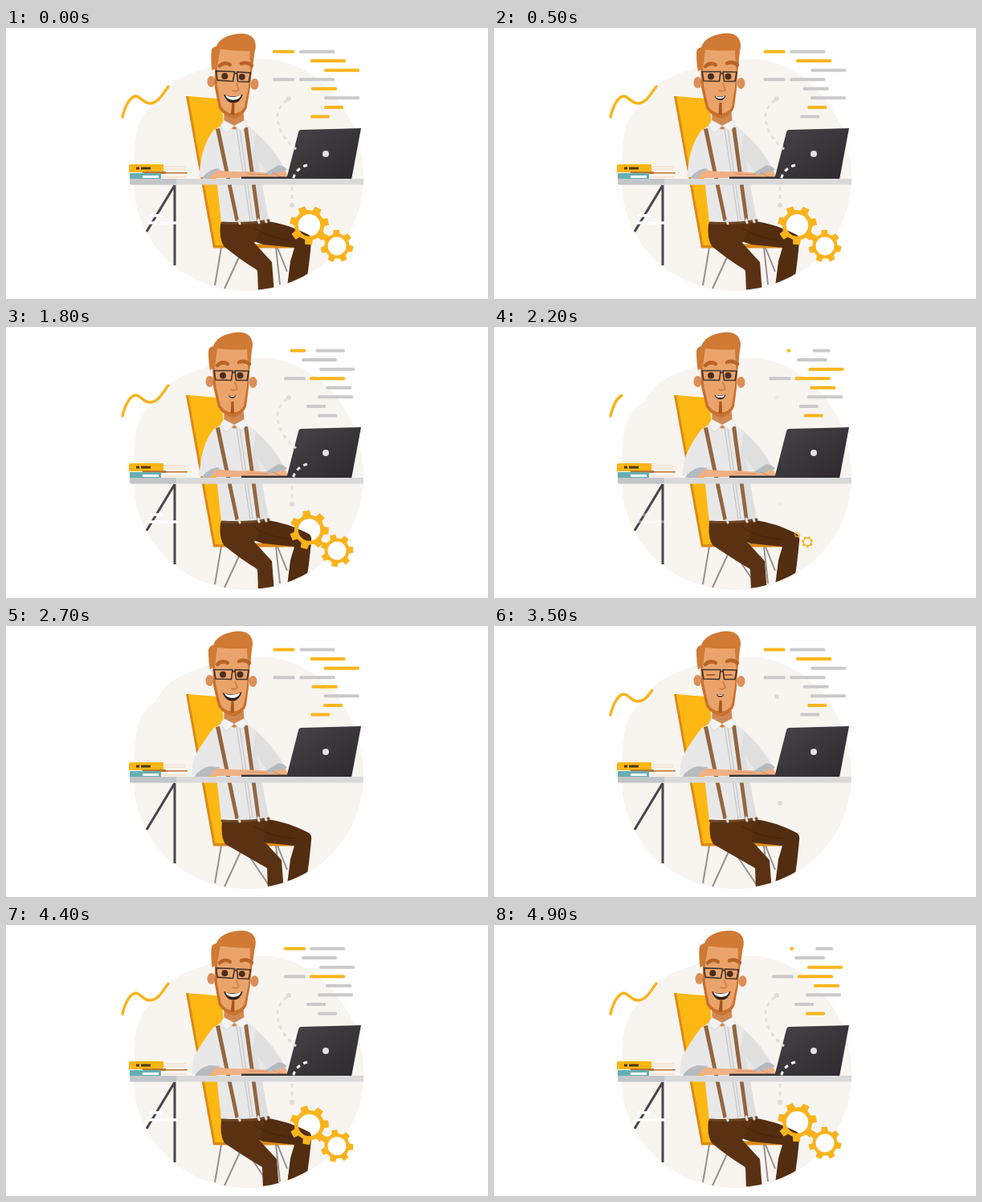
These frames come from a looping animation (600x338 px, 5000 ms). An HTML page:

```html
<!DOCTYPE html>
<html lang="en">
<head>
<meta charset="utf-8">
<title>Developer at a desk</title>
<style>
html, body { margin: 0; width: 100%; height: 100%; overflow: hidden; background: #fff; }
svg { display: block; width: 100%; height: 100%; }
.line { fill: none; stroke-linecap: round; stroke-linejoin: round; }
.flat { fill: none; }
</style>
</head>
<body>
<svg viewBox="0 0 600 338">
  <defs>
    <clipPath id="disc"><circle cx="302" cy="184" r="143"/></clipPath>
    <linearGradient id="lid" x1="0" y1="0" x2="1" y2="1">
      <stop offset="0" stop-color="#464447"/><stop offset="1" stop-color="#2b292b"/>
    </linearGradient>
  </defs>

  <path fill="#f8f4f0" d="M160 170C158 128 168 103 187 94C199 66 225 58 250 50C270 41 300 38 330 39C392 47 444 108 445 184C446 264 382 328 302 328C232 328 172 284 160 210Z"/>
  <path id="squiggle" class="line" pathLength="100" stroke="#f9b31c" stroke-width="3.4" d="M145 111C148 98 154 86 161 85C168 85 170 94 180 94C190 93 195 82 202 73"/>
  <g id="rows"></g>

  <!-- chair -->
  <path class="flat" stroke="#96928f" stroke-width="2" d="M268 274L260 321M295 275L272 325M296 277L327 323M336 274L341 320M338 274L350 304"/>
  <path fill="#dc8a15" d="M224 85H228L262 270L366 269L363 274.500H258Z"/>
  <path fill="#fdb813" d="M227 85L263 88Q268 90 269 98L276 180L272 230L278 271H260.500Z"/>

  <!-- table legs -->
  <path class="flat" stroke="#48464b" stroke-width="3" d="M210 196L175 254M210 196V296"/>
  <path id="cuts" class="line" stroke="#fff" stroke-width="3.500" d="M180 234H194M178 243H213"/>

  <circle id="hole1" fill="#fff"/><circle id="hole2" fill="#fff"/>

  <!-- trousers -->
  <g clip-path="url(#disc)">
    <path fill="#532d10" d="M300 243L326 241Q352 245 377 258Q381 261 380 267Q378 292 372 330H349L354 291L359 274L320 270L296 262Z"/>
    <path id="leg" fill="#5a3213"/>
    <path class="line" stroke="#462408" d="M309 250Q330 263 358 265"/>
  </g>

  <!-- shirt -->
  <path id="shirt" fill="#e9e8e8"/>
  <path fill="#e0dfe0" d="M311 131Q331 149 348 177L326 181L313 163L327 239L318 241L303 180Z"/>
  <path class="line" stroke="#c6c5c7" stroke-width="1.200" d="M287 126L304 240M291 126L307 239"/>
  <path fill="#936640" d="M261 126L266 125L290 240L285.500 241ZM296 124L301 124L316.500 239L312 240Z"/>
  <path class="line" stroke="#6d4725" stroke-width="3" d="M269 243Q300 245 327 240"/>
  <path class="line" stroke="#dedbd8" stroke-width="3" d="M290 240L291 244M314 239L315 243M323 239L324 242"/>

  <!-- head -->
  <path fill="#d08850" d="M272 99H295L297 120L284 127L271 120Z"/>
  <path fill="#f4f3f3" stroke="#d0cfd0" stroke-width=".6" d="M271 115L284 122L274 131L267 122ZM297 115L284 122L294 129L300 121Z"/>
  <g id="head">
    <ellipse cx="253.500" cy="68" rx="5" ry="7" fill="#dc8f58"/>
    <ellipse cx="307.500" cy="69" rx="5" ry="7" fill="#dc8f58"/>
    <path fill="#c9712e" d="M257 44H304L302 76L299 99Q296 108 284 113Q270 110 264 100L258 74Z"/>
    <path fill="#eaa46b" d="M259 26H303L300 74L296 98Q293 105 283 107Q272 106 267 98L261 72Z"/>
    <path fill="#cf7a35" d="M254 54Q252 45 252 31Q252 25 258 24Q262 12 279 8Q295 4 303 11Q309 18 306 29L304 50L301 50L300 28Q282 29 263 27L260 50Z"/>
    <path class="line" stroke="#b96427" stroke-width="4.500" d="M263 48Q269 42 276 46M290 44Q297 41 303 46"/>
    <g id="open" fill="#4a2e1f"><circle cx="270" cy="60.500" r="4"/><circle cx="291.500" cy="60.500" r="4"/></g>
    <path id="shut" class="line" stroke="#8a5230" stroke-width="1.500" d="M265 61H275M287 61H296"/>
    <path class="line" stroke="#42332c" stroke-width="1.600" d="M259 54.500L282 54.500L280.500 66.500L261 66ZM285 54.500L302 55L300 66.500L286.500 66.500ZM282 57Q283.500 56 285 57"/>
    <path class="line" stroke="#d3834c" stroke-width="2" d="M285 69L288 77Q285 80 281 78"/>
    <g id="mouth">
      <path fill="#30221c" d="M-12 -3Q0 2 12 -4Q9 8 0 8Q-8 8 -12 -3Z"/>
      <path fill="#fff" d="M-10 -2Q0 2.500 10 -3Q8 4 0 4Q-7 4 -10 -2Z"/>
    </g>
    <path fill="#a8571e" d="M280.500 93H283.500L284 108H279.500Z"/>
  </g>

  <!-- arms -->
  <path fill="#efb084" d="M258 176Q276 180 298 179L333 181L347 176L352 187H252Z"/>
  <path id="cuff" fill="#b6bbc0"/>
  <path fill="#b6bbc0" d="M323 181L339 171Q347 172 350 177L329 183Z"/>
  <path class="line" stroke="#d98f63" d="M301 182L326 183M332 181L343 186"/>
  <path fill="#39373a" d="M293 185.500H352V188.500H293Z"/>

  <!-- laptop -->
  <path fill="url(#lid)" d="M367 127L442 125L430 189H349L364 130Q365 127 367 127Z"/>
  <circle cx="398" cy="157" r="4" fill="#e2e2e2"/>

  <!-- books -->
  <path fill="#faf4ee" d="M190 170H224V188H190Z"/>
  <path class="line" stroke="#efd8c4" d="M196 173H224M196 176H223M196 186H224"/>
  <path fill="#fbb514" d="M153 171L155 170H196V180H153Z"/>
  <path fill="#b97635" d="M170 179H199V182H170ZM199 180H226V181.500H199Z"/>
  <path fill="#67aeb2" d="M154 181H193V189H154Z"/>
  <path fill="#4d3713" d="M162 173.500H166V176.500H162ZM168 173.500H180V176.500H168Z"/>
  <path fill="#fff" d="M170 184H190V187H170Z"/>

  <!-- table top -->
  <path fill="#d9d9da" d="M154 188H445V195.500H154Z"/>
  <path fill="#c3c6c9" d="M154 188H212V195.500H157Q154 195 154 192Z"/>

  <!-- dotted links -->
  <g id="links" class="flat" stroke="#e2dfdd" stroke-width="3" stroke-dasharray="5 5">
    <path d="M350 90Q337 99 338 114Q341 136 361 151M356 198V219"/>
    <path stroke="#fff" d="M375 171Q360 175 357 190"/>
  </g>
  <g id="ends" fill="#dedbd9"><circle cx="352" cy="88" r="3"/><circle cx="356" cy="221" r="3"/></g>

  <path id="gear1" fill="#f9b31c" fill-rule="evenodd"/>
  <path id="gear2" fill="#f9b31c" fill-rule="evenodd"/>
</svg>

<script>
const LOOP = 5000, STEP = 100, CYCLE = 3000;
const YELLOW = '#fbb51d', GREY = '#cbc9c9';
const $ = id => document.getElementById(id);
const set = (el, attrs) => { for (const k in attrs) el.setAttribute(k, attrs[k]); };
const show = (el, on) => el.style.display = on ? '' : 'none';

// Eased 0 to 1 between two times.
function ramp(t, from, to) {
  const x = Math.min(1, Math.max(0, (t - from) / (to - from)));
  return x * x * (3 - 2 * x);
}
// 1 at rest, falls to 0 at one time and comes back at another.
const rest = (t, leave, back, span = 500) =>
  1 - ramp(t, leave, leave + span) + ramp(t, back, back + span);

// Code bars: each slides aside during a cycle and may change colour on the way.
const tones = {
  yellow: () => true,
  grey: () => false,
  early: p => p < 200 || p > 1850,
  late: p => p < 750 || p > 2300,
  middle: p => p > 750 && p < 2300
};
const bars = [];
function bar(row, x, w, shift, tone) {
  const el = document.createElementNS('http://www.w3.org/2000/svg', 'rect');
  set(el, { y: 27.5 + row * 11.57, height: 4, rx: 1.5 });
  $('rows').append(el);
  bars.push({ el, row, x, w, shift, tone });
}
for (const row of [0, 3]) {
  bar(row, 332, 27, 14, row ? 'grey' : 'yellow');
  bar(row, 365, 44, 13, row ? 'middle' : 'grey');
}
bar(1, 379, 44, -11, 'late');
bar(2, 396, 44, -6, 'early');
bar(4, 380, 32, 18, 'early');
bar(5, 396, 44, -8, 'grey');
bar(6, 396, 24, -22, 'late');
bar(7, 379, 24, 9, 'early');

function drawBars(p) {
  const slide = 1 - rest(p, 200, 1900, 900);
  // The top rows are wiped from the left and drawn again.
  const wipe = 30 * (1 - rest(p, 1700, 2100, 300));
  for (const b of bars) {
    const cut = Math.min(b.w, Math.max(0, wipe - b.row * 16));
    set(b.el, {
      x: b.x + b.shift * slide + cut, width: b.w - cut,
      fill: tones[b.tone](p) ? YELLOW : GREY
    });
  }
}

const ring = (x, y, r) => `M${x - r} ${y}a${r} ${r} 0 1 0 ${2 * r} 0a${r} ${r} 0 1 0 ${-2 * r} 0Z`;

function gear(n, x, y, r, turn) {
  const teeth = 7, points = [];
  const add = (deg, len) => {
    const a = deg * Math.PI / 180;
    points.push(`${x + Math.cos(a) * len} ${y + Math.sin(a) * len}`);
  };
  for (let i = 0; i < teeth; i++) {
    const mid = turn + i * 360 / teeth;
    add(mid - 15, r * .77);
    add(mid - 10, r);
    add(mid + 10, r);
    add(mid + 15, r * .77);
  }
  show($('gear' + n), r > .5);
  show($('hole' + n), r > .5);
  set($('gear' + n), { d: `M${points.join('L')}Z` + ring(x, y, r * .56) });
  set($('hole' + n), { cx: x, cy: y, r: r * .6 });
}

function draw(t) {
  drawBars(t % CYCLE);

  const drawn = 100 * rest(t, 1900, 3100);
  set($('squiggle'), { 'stroke-dasharray': drawn + ' 200' });
  show($('squiggle'), drawn > 0);

  const blink = t >= 3400 && t < 3600;
  show($('open'), !blink);
  show($('shut'), blink);
  set($('head'), { transform: `rotate(${2.4 * rest(t, 0, 3500)} 282 115)` });
  const smile = Math.min(rest(t, 0, 1900, 800), rest(t, 2900, 3700, 600));
  const size = .4 + .6 * smile;
  set($('mouth'), { transform: `translate(281.5 86) scale(${size} ${size - .06})` });

  // Front leg swings forward while the gears are away.
  const swing = 1 - rest(t, 1900, 4100, 600);
  const f = 12 * swing, s = 2 * swing;
  set($('leg'), { d: `M${267 + s} 244L322 243L${309 + f} 268L${331 + f} 292L${334 + f} 331H${314 + f}L${313 + f} 302Q${294 + f} 291 ${271 + s} 272Q${265 + s} 263 ${267 + s} 244Z` });

  const elbow = 240 - 9 * ramp(t, 1900, 2400);
  set($('shirt'), { d: `M270 120L258 128Q247 142 ${elbow + 3} 164L${elbow} 186L262 187L268 243Q298 245 327 239L315 180L326 181L348 177Q334 149 311 130L299 120L284 124Z` });
  set($('cuff'), { d: `M${elbow + 4} 188Q${elbow + 8} 179 ${elbow + 22} 175L267 176Q256 180 254 188Z` });

  // Gears hover, sink and shrink away, then float up again.
  const sink = 14 * (1 - rest(t, 1200, 3600, 1200));
  const one = rest(t, 1900, 3500, 400), two = rest(t, 1900, 3750, 500);
  const y = 246 + sink, turn = 92 + sink * 2;
  gear(1, 377.5, y, 24.5 * one, turn);
  gear(2, 378 + 34 * two, y + 26 * two, 20.5 * two, -turn);

  set($('links'), { opacity: rest(t, 1700, 3500) });
  set($('ends'), { opacity: rest(t, 1900, 3000) });
  set($('cuts'), { opacity: rest(t, 1900, 3600) });
}

const start = performance.now();
function tick() {
  const t = (performance.now() - start) % LOOP;
  draw(Math.floor(t / STEP) * STEP);
  requestAnimationFrame(tick);
}
tick();
</script>
</body>
</html>
```
